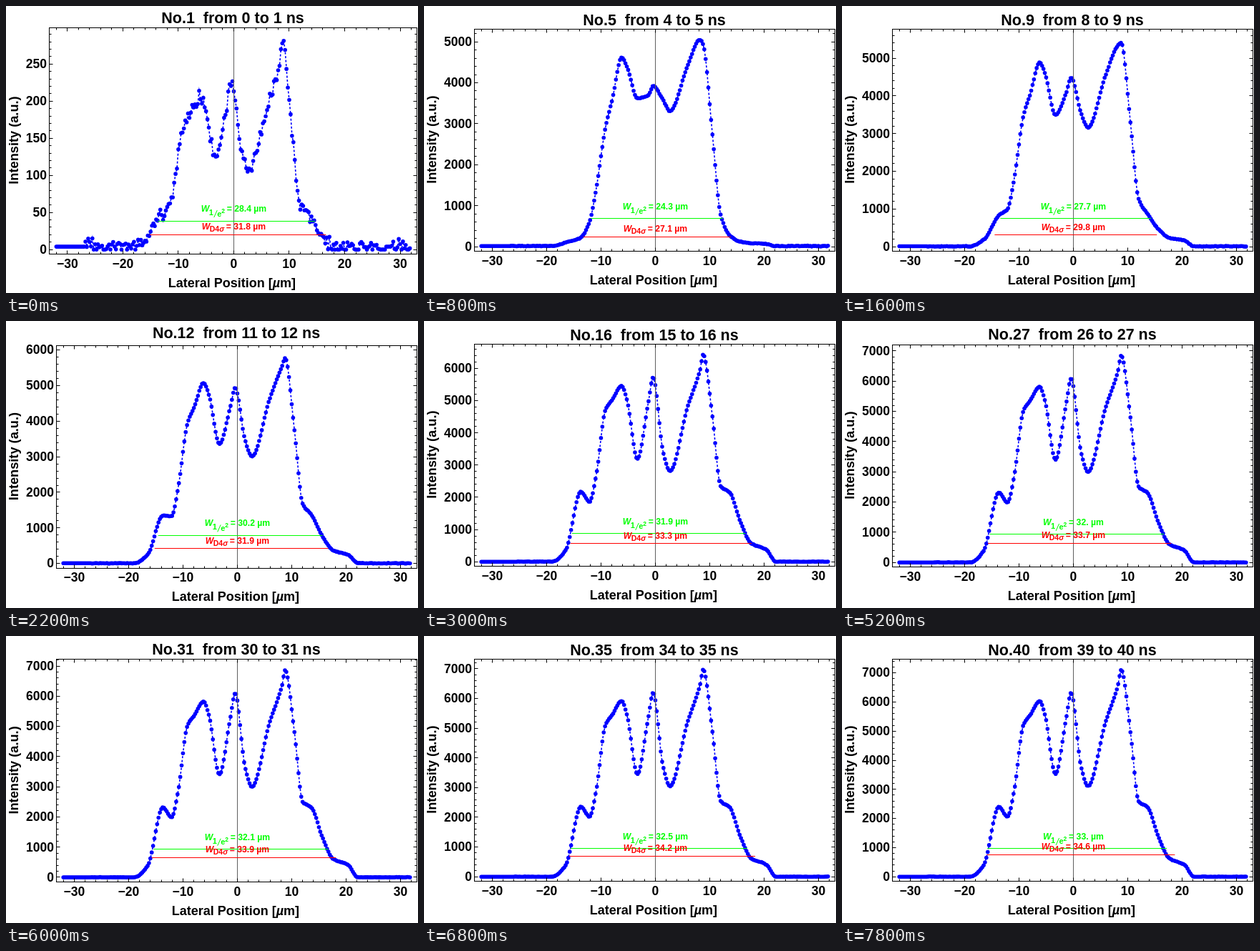
An HTML page with a canvas that plays this animation: 576 by 402 pixels, repeating every 8000 ms.

```html
<!DOCTYPE html>
<html lang="en">
<head>
<meta charset="utf-8">
<title>Intensity profile</title>
<style>
  html, body { margin: 0; width: 100%; height: 100%; overflow: hidden; background: #fff; }
  canvas { display: block; width: 100vw; height: 100vh; }
</style>
</head>
<body>
<canvas id="plot" width="576" height="402"></canvas>
<script>
const ctx = document.getElementById('plot').getContext('2d');
const STEP_MS = 200, STEPS = 40, FORMED = 4, SETTLED = 15;
const SANS = '"Liberation Sans", Arial, sans-serif';
const PEAK = 290; // shape heights are relative to this peak
const RIGHT = 574.5, LIME = '#00ff00', RED = '#ff0000', BLUE = '#0000ff';

// step, peak intensity, 1/e² width, D4σ width
const keys = [
  [0, 285, 28.4, 31.8], [4, 5050, 24.3, 27.1], [11, 5820, 30.2, 31.9], [15, 6430, 31.9, 33.3],
  [21, 6840, 31.9, 33.5], [30, 6860, 32.1, 33.9], [39, 7110, 33, 34.6],
];

// Peaks, valleys and shoulders: position, height when formed, height when settled
const shape = [
  [-19, 1, 0], [-16.5, 6, 16], [-13.7, 13, 98], [-12.1, 35, 84], [-10.9, 80, 120], [-9.2, 166, 212],
  [-7.9, 207, 227], [-6.2, 265, 246], [-5.2, 252, 226], [-3.3, 208, 144], [-1.3, 212, 223], [-.4, 225, 258],
  [1.4, 206, 155], [2.7, 190, 127], [5.9, 253, 216], [8.2, 290, 268], [8.8, 283, 290], [10.5, 157, 203],
  [12, 45, 106], [13.7, 16, 97], [15.6, 7, 57], [17.6, 5, 26], [20.4, 4, 17], [22.2, 1, 0],
];

const mix = (a, b, f) => a + (b - a) * f;
const clamp = v => Math.min(1, Math.max(0, v));

function statsAt(step) {
  const i = Math.max(1, keys.findIndex(k => k[0] >= step));
  const a = keys[i - 1], b = keys[i], f = (step - a[0]) / (b[0] - a[0]);
  const [, max, width, sigma] = a.map((v, n) => mix(v, b[n], f));
  return { max, width, sigma };
}

// The first shot resembles the settled shape under a narrower envelope
const envelope = x => .86 * Math.exp(-((x / 15) ** 4)) + .2 * Math.exp(-(((x - 9) / 1.5) ** 2));

function profileAt(step) {
  const strength = statsAt(Math.max(step, FORMED)).max;
  const settling = clamp((step - FORMED) / (SETTLED - FORMED));
  const values = shape.map(([x, formed, settled]) => {
    const first = 4 + settled * envelope(x);
    return mix(first * keys[0][1], mix(formed, settled, settling) * strength, clamp(step / FORMED)) / PEAK;
  });
  return monotone(shape.map(p => p[0]), values);
}

// Shape-preserving cubic through the points
function monotone(xs, ys) {
  const n = xs.length;
  const slope = i => (ys[i + 1] - ys[i]) / (xs[i + 1] - xs[i]);
  const tangents = xs.map((_, i) => {
    if (i === 0 || i === n - 1) return 0;
    const l = slope(i - 1), r = slope(i);
    return l * r <= 0 ? 0 : 2 * l * r / (l + r);
  });
  return x => {
    if (x <= xs[0]) return ys[0];
    if (x >= xs[n - 1]) return ys[n - 1];
    const i = xs.findIndex(k => k > x) - 1, d = xs[i + 1] - xs[i], t = (x - xs[i]) / d, u = 1 - t;
    return u * u * ((1 + 2 * t) * ys[i] + t * d * tangents[i])
      + t * t * ((3 - 2 * t) * ys[i + 1] - u * d * tangents[i + 1]);
  };
}

function randomFrom(seed) {
  return () => (seed = (seed * 16807) % 2147483647) / 2147483647;
}

function text(str, x, y, size, { style = 'bold', align = 'left', color = '#000' } = {}) {
  ctx.font = `${style} ${size}px ${SANS}`;
  ctx.textAlign = align;
  ctx.fillStyle = color;
  ctx.fillText(str, x, y);
  return ctx.measureText(str).width;
}

function line(x1, y1, x2, y2, color = '#000') {
  ctx.strokeStyle = color;
  ctx.beginPath();
  ctx.moveTo(x1, y1);
  ctx.lineTo(x2, y2);
  ctx.stroke();
}

const crisp = v => Math.floor(v) + .5;
const tickStep = max => max < 350 ? 50 : max < 1600 ? 200 : max < 3500 ? 500 : 1000;

function widthLabel(value, isSigma, cx, cy, color) {
  const rounded = Math.round(value * 10) / 10;
  const label = `= ${rounded}${Number.isInteger(rounded) ? '.' : ''} µm`;
  const lead = isSigma ? 34 : 36;
  ctx.font = `bold 12.2px ${SANS}`;
  const x = cx - (lead + ctx.measureText(label).width) / 2;
  const y = cy + 4.5;
  text('W', x, y, 12.2, { style: 'italic bold', color });
  if (isSigma) {
    const w = text('D4', x + 11, y + 3, 10.5, { color });
    text('σ', x + 11 + w, y + 3, 10.5, { style: 'italic bold', color });
  } else {
    text('1', x + 11, y + 5, 11, { color });
    line(x + 18, y + 8, x + 22.5, y - 2, color);
    text('e', x + 22.5, y + 6.5, 11, { color });
    text('2', x + 28.5, y + 2, 8.5, { color });
  }
  text(label, x + lead, y, 12.2, { color });
}

function draw(step) {
  const { max, width, sigma } = statsAt(step);
  const profile = profileAt(step);
  const major = tickStep(max), minor = major / (major === 200 ? 4 : 5);
  const left = max < 1000 ? 60.5 : 70.5;
  const height = (RIGHT - left) / 1.618;
  const span = height - 21.5;

  // A tick label that rises above the frame pushes the title up
  const headroom = max * (1 + 15 / span);
  const topTick = Math.floor(headroom / major) * major;
  const tickGap = 15 + (1 - topTick / max) * span;
  const extra = Math.max(0, 10.5 - tickGap) * 1.1;
  const top = (max < 1000 ? 30 : 32.2) + extra / 2;
  const bottom = top + height, zero = bottom - 6.5;
  const frameTop = crisp(top), frameBottom = crisp(bottom);
  const px = x => left + (x + 33.275) / 66.3 * (RIGHT - left);
  const py = v => zero - v / max * span;
  const middle = (left + RIGHT) / 2, axis = px(0);

  ctx.fillStyle = '#fff';
  ctx.fillRect(0, 0, 576, 402);

  // Measured points
  const random = randomFrom(7919 + step * 131);
  const points = Array.from({ length: 256 }, (_, i) => {
    const x = -32 + i / 4;
    const noise = (random() + random() - 1) * 12;
    return [px(x), py(Math.max(0, profile(x) + (x > -27 ? noise : 0)))];
  });
  ctx.strokeStyle = ctx.fillStyle = BLUE;
  ctx.lineWidth = 1.6;
  ctx.setLineDash([3, 2.5]);
  ctx.beginPath();
  points.forEach(p => ctx.lineTo(...p));
  ctx.stroke();
  ctx.setLineDash([]);
  for (const [x, y] of points) {
    ctx.beginPath();
    ctx.arc(x, y, 2.8, 0, 7);
    ctx.fill();
  }

  // Frame, ticks and centre axis
  ctx.lineWidth = 1;
  line(crisp(axis), frameTop, crisp(axis), frameBottom, '#606060');
  ctx.strokeStyle = '#000';
  ctx.strokeRect(left, frameTop, RIGHT - left, frameBottom - frameTop);
  for (let x = -32; x <= 32; x += 2) {
    const len = x % 10 ? 3 : 5, p = crisp(px(x));
    line(p, frameBottom, p, frameBottom - len);
    line(p, frameTop, p, frameTop + len);
    if (x % 10 === 0) text(String(x).replace('-', '−'), px(x), bottom + 19.3, 17.5, { align: 'center' });
  }
  for (let v = 0; v <= headroom; v += minor) {
    const isMajor = v % major === 0, len = isMajor ? 5 : 3, p = crisp(py(v));
    line(left, p, left + len, p);
    line(RIGHT, p, RIGHT - len, p);
    if (isMajor) text(v, left - 3.5, py(v) + 5.8, 17.5, { align: 'right' });
  }

  // Width markers: the wider the beam, the higher and further right they sit
  const marker = (w, centre, v, color) =>
    line(px(centre - w / 2), crisp(py(v)), px(centre + w / 2), crisp(py(v)), color);
  const spread = (sigma - 27.1) ** 2;
  const cut = max / Math.E ** 2, sigmaCut = (14 + .3 * spread) / PEAK * max;
  marker(width, .25 + .05 * (width - 24.3), cut, LIME);
  marker(sigma, .3 + .019 * spread, sigmaCut, RED);
  widthLabel(width, false, axis, py(cut) - 17.5, LIME);
  widthLabel(sigma, true, axis, py(sigmaCut) - 11.5, RED);

  // Titles
  text(`No.${step + 1}  from ${step} to ${step + 1} ns`, middle - .5, top - 5.7 - extra, 21.5, { align: 'center' });
  const parts = [['Lateral Position [', 'bold'], ['µ', 'italic bold'], ['m]', 'bold']];
  let x = middle - 90.8;
  for (const [str, style] of parts) x += text(str, x, bottom + 46.2, 18, { style });
  ctx.save();
  ctx.translate(17, (top + bottom) / 2 - .8);
  ctx.rotate(-Math.PI / 2);
  text('Intensity (a.u.)', 0, 0, 18.2, { align: 'center' });
  ctx.restore();
}

let start, shown = -1;
function tick(now) {
  start ??= now;
  const step = Math.floor((now - start) / STEP_MS) % STEPS;
  if (step !== shown) draw(shown = step);
  requestAnimationFrame(tick);
}
requestAnimationFrame(tick);
</script>
</body>
</html>
```
